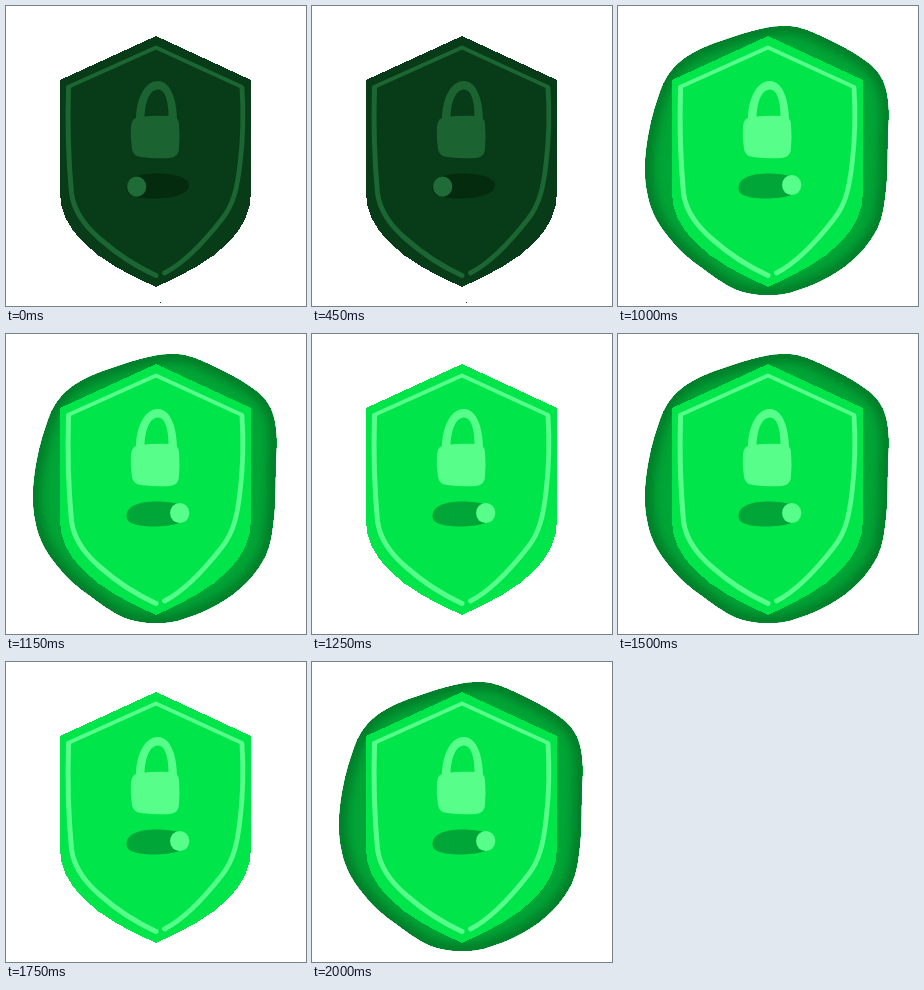
An HTML page that plays this animation: 300x300 px, repeating every 2.25 s.

```html
<!DOCTYPE html>
<html lang="en">
<head>
<meta charset="utf-8">
<title>Shield switch</title>
<style>
  html, body { margin: 0; width: 100%; height: 100%; overflow: hidden; background: #fff; }
  svg { display: block; width: 100vw; height: 100vh; }
  .crisp { shape-rendering: crispEdges; }
  #art { --base: #083b17; --light: #1b6331; --rim: #1b6632; --track: #052b0e; --knob: #206c38; }
  #art.on { --base: #00e64a; --light: #57ff8a; --rim: #57ff8a; --track: #00a637; --knob: #57ff8a; }
  .base { fill: var(--base); }
  .light { fill: var(--light); }
  .rim { fill: none; stroke: var(--rim); stroke-linecap: round; stroke-linejoin: round; }
  .track { fill: var(--track); }
  .knob { fill: var(--knob); }
</style>
</head>
<body>
<svg id="art" viewBox="0 0 300 300">
  <defs>
    <path id="blob" d="M164 20C182 19 196 27 209 33C221 39 234 45 246 54C257 61 265 71 268 84C271 97 271 110 270 124C269 146 270 163 268 182C266 199 265 210 259 223C250 240 240 250 226 261C209 273 195 279 180 284C170 288 160 289 149 289C138 289 127 287 117 283C104 277 94 269 83 261C71 253 60 243 50 230C40 218 33 205 30 190C27 176 26 162 28 146C30 127 34 109 41 89C46 73 54 61 67 52C80 43 94 38 109 33C127 27 145 21 164 20Z"/>
    <clipPath id="inside"><use href="#blob"/></clipPath>
    <filter id="soft" x="-20%" y="-20%" width="140%" height="140%"><feGaussianBlur stdDeviation="6"/></filter>
  </defs>

  <g id="glow">
    <use href="#blob" class="crisp" fill="#00a637"/>
    <g clip-path="url(#inside)">
      <use href="#blob" fill="none" stroke="#007626" stroke-width="14" filter="url(#soft)"/>
    </g>
  </g>

  <path class="base crisp" d="M150 30L245 74V187C245 205 237 221 224 235C204 256 178 268 150 281C122 268 96 256 76 235C62 221 54 205 54 187V74Z"/>

  <path class="rim" stroke-width="3.8" d="M62 81L150 41.500L236 81"/>
  <path class="rim" stroke-width="5" d="M62.500 82C61.500 115 62 150 65.500 187C68 207 80 221 94 233C111 248 129 260 150 269.500"/>
  <path class="rim" stroke-width="4.800" d="M236 82C237.500 105 237 133 234 158C231.500 180 228 198 216 213C202 231 182 255 158.500 267"/>

  <path class="light" d="M130 114C130 94 138 75 152 75C165 75 171 95 171 114H162.500C163 98 160 83.500 152 83.500C143 83.500 138.500 98 138.500 114Z"/>
  <path class="light" d="M134 111Q149 109 165 110Q172 110 173 118Q174 131 173 142Q173 151 164 152Q149 153 135 151Q127 150 126 143Q124 131 125 120Q126 111 134 111Z"/>

  <path class="track" d="M120.500 182C120.500 173 131 168 147 167.500C167 167 183 171 183 179.500C183 188 167 192.500 147 192.500C131 192 120.500 190 120.500 182Z"/>
  <ellipse id="knob" class="knob" rx="9.600" ry="10.100"/>
  <rect id="speck" x="154" y="296" width="1" height="1" fill="#083b17"/>
</svg>
<script>
  const LOOP = 2250, ON_AT = 750, BEAT = 250;
  const get = id => document.getElementById(id);
  const art = get('art'), glow = get('glow'), knob = get('knob'), speck = get('speck');
  const show = (el, yes) => el.setAttribute('visibility', yes ? 'visible' : 'hidden');

  function draw(ms) {
    const t = ms % LOOP;
    const on = t >= ON_AT;
    art.classList.toggle('on', on);
    knob.setAttribute('cx', on ? 173.7 : 130.7);
    knob.setAttribute('cy', on ? 179 : 180.7);
    show(glow, on && Math.floor((t - ON_AT) / BEAT) % 2 === 1);
    show(speck, !on);
  }

  function tick() {
    draw(performance.now());
    requestAnimationFrame(tick);
  }
  tick();
</script>
</body>
</html>
```
